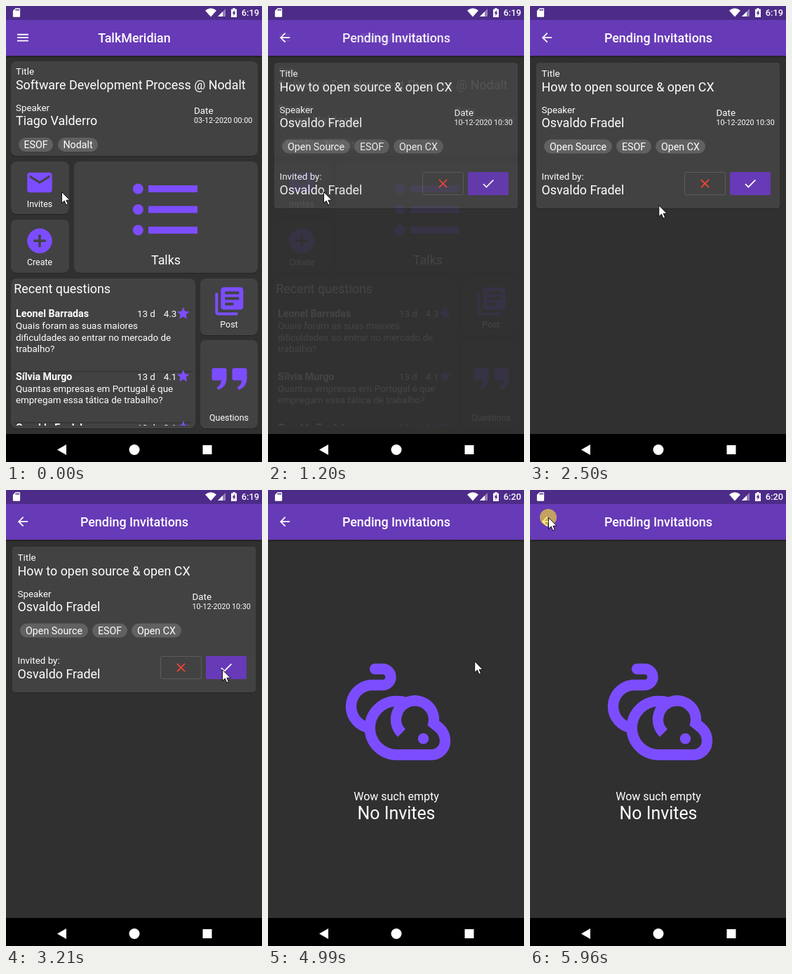
Write an HTML page that moves like this. It is 365 px wide and 651 px high and loops after 5.99 s.

```html
<!DOCTYPE html>
<html lang="pt">
<head>
<meta charset="utf-8">
<style>
html, body { margin: 0; width: 100%; height: 100%; overflow: hidden; background: #303030; }
svg { display: block; width: 365px; height: 651px; font-family: Roboto, sans-serif; fill: #fff; }
</style>
</head>
<body>
<svg id="stage" viewBox="0 0 365 651"></svg>
<script>
const ACCENT = '#7c4dff', PURPLE = '#673ab7';
const LOOP = 5990;
const SMALL = 13.4, CHIP = 14.25, LABEL = 12.45, LARGE = 17.9;

const paths = {
  menu: 'M3 18h18v-2H3v2zm0-5h18v-2H3v2zm0-7v2h18V6H3z',
  back: 'M20 11H7.83l5.59-5.59L12 4l-8 8 8 8 1.41-1.41L7.83 13H20v-2z',
  mail: 'M20 4H4c-1.1 0-2 .9-2 2v12c0 1.1.9 2 2 2h16c1.1 0 2-.9 2-2V6c0-1.1-.9-2-2-2zm0 4l-8 5-8-5V6l8 5 8-5v2z',
  add: 'M12 2a10 10 0 1 0 0 20a10 10 0 1 0 0-20zm5 11h-4v4h-2v-4H7v-2h4V7h2v4h4v2z',
  books: 'M4 6H2v14c0 1.1.9 2 2 2h14v-2H4V6zm16-4H8c-1.1 0-2 .9-2 2v12c0 1.1.9 2 2 2h12c1.1 0 2-.9 2-2V4c0-1.1-.9-2-2-2zm-1 9H9V9h10v2zm-4 4H9v-2h6v2zm4-8H9V5h10v2z',
  star: 'M12 17.27L18.18 21l-1.64-7.03L22 9.24l-7.19-.61L12 2 9.19 8.63 2 9.24l5.46 4.73L5.82 21z',
  close: 'M19 6.41L17.59 5 12 10.59 6.41 5 5 6.41 10.59 12 5 17.59 6.41 19 12 13.41 17.59 19 19 17.59 13.41 12z',
  check: 'M9 16.17L4.83 12l-1.42 1.41L9 19 21 7l-1.41-1.41z',
  sd: 'M18 2h-8L4 8v12c0 1.1.9 2 2 2h12c1.1 0 2-.9 2-2V4c0-1.1-.9-2-2-2zm-6 6h-2V4h2v4zm3 0h-2V4h2v4zm3 0h-2V4h2v4z'
};

const text = (x, y, size, str, attrs = '') => `<text x="${x}" y="${y}" font-size="${size}" ${attrs}>${str}</text>`;
const middle = (x, y, size, str, attrs = '') => text(x, y, size, str, `text-anchor="middle" ${attrs}`);
const rect = (x, y, w, h, fill, attrs = '') => `<rect x="${x}" y="${y}" width="${w}" height="${h}" fill="${fill}" ${attrs}/>`;
const icon = (name, x, y, scale, fill = '#fff') =>
  `<path d="${paths[name]}" fill="${fill}" transform="translate(${x} ${y}) scale(${scale}) translate(-12 -12)"/>`;
const card = (x, y, w, h, r = 8) =>
  rect(x, y + 1, w, h, '#000', `rx="${r}" opacity=".25"`) + rect(x, y, w, h, '#424242', `rx="${r}"`);
const chip = (x, y, w, str) => rect(x, y, w, 20, '#616161', 'rx="10"') + middle(x + w / 2, y + 15, CHIP, str);

const page = (title, nav) => rect(0, 0, 365, 651, '#303030') + rect(0, 71, 365, 4, 'url(#shade)') +
  rect(0, 0, 365, 71, PURPLE) + icon(nav, 24, 45.2, .888) + middle(183, 52, LARGE, title, 'font-weight="500"');

// Shared heading of both talk cards
const talk = (x, y, dateX, title, speaker, date) =>
  text(x, y, SMALL, 'Title') + text(x, y + 21, LARGE, title) +
  text(x, y + 51.5, SMALL, 'Speaker') + text(x, y + 72, LARGE, speaker) +
  text(dateX, y + 55.5, SMALL, 'Date') + text(dateX, y + 68.5, 10.7, date);

const question = (y, name, score, lines) =>
  text(14, y, CHIP, name, 'font-weight="700"') + text(187, y, SMALL, '13 d') + text(224.8, y, SMALL, score) +
  icon('star', 252.7, y - 5.3, .89, ACCENT) +
  lines.map((line, i) => text(14, y + 17.3 + i * 16.4, SMALL, line)).join('') +
  rect(11, y + 28 + lines.length * 16.3, 255, 2, '#000', 'opacity=".15" rx="1"');

const bullets = [261, 290.5, 320].map(y =>
  `<circle cx="188.3" cy="${y}" r="7.5" fill="${ACCENT}"/>` + rect(203, y - 5, 70, 10, ACCENT)).join('');

const quotes = [293.5, 322.5].map(x =>
  `<path d="M3 0h15q3 0 3 3v11q0 13-12 17l-2-3.5q6-3 6.5-10H3q-3 0-3-3V3q0-3 3-3z" fill="${ACCENT}" transform="translate(${x} 517)"/>`).join('');

const home = page('TalkMeridian', 'menu') +
  card(7, 79, 352, 135) +
  talk(14, 98, 268, 'Software Development Process @ Nodalt', 'Tiago Valderro', '03-12-2020 00:00') +
  chip(18, 188, 49, 'ESOF') + chip(74, 188, 57, 'Nodalt') +
  card(7, 222, 83, 75) + '<circle id="ripple" clip-path="url(#tile)"/>' +
  icon('mail', 48, 252, 1.776, ACCENT) + middle(48, 286.5, LABEL, 'Invites') +
  card(7, 305, 83, 76) + icon('add', 48, 335.3, 1.776, ACCENT) + middle(48, 370, LABEL, 'Create') +
  card(97, 222, 262, 159) + bullets + middle(228, 369, LARGE, 'Talks') +
  card(7, 389, 263, 214) + text(11.3, 410, LARGE, 'Recent questions') +
  '<g clip-path="url(#list)">' +
  question(444, 'Leonel Barradas', '4.3',
    ['Quais foram as suas maiores', 'dificuldades ao entrar no mercado de', 'trabalho?']) +
  question(533.5, 'Sílvia Murgo', '4.1',
    ['Quantas empresas em Portugal é que', 'empregam essa tática de trabalho?']) +
  question(606.5, 'Osvaldo Fradel', '3.1', []) + '</g>' +
  card(277, 389, 82, 81) + icon('books', 318.3, 421.5, 2, ACCENT) + middle(318, 458.5, LABEL, 'Post') +
  card(277, 477, 82, 126) + quotes + middle(318, 592, LABEL, 'Questions');

const invite = card(9, 81, 347, 208, 4) +
  talk(16.5, 101, 265.5, 'How to open source &amp; open CX', 'Osvaldo Fradel', '10-12-2020 10:30') +
  chip(20, 190.5, 97, 'Open Source') + chip(123, 190.5, 50, 'ESOF') + chip(179, 190.5, 71, 'Open CX') +
  text(16.5, 247.5, SMALL, 'Invited by:') + text(16.5, 268.5, LARGE, 'Osvaldo Fradel') +
  rect(220.5, 237.5, 58, 32, 'none', 'rx="2" stroke="#5c5c5c"') + icon('close', 249.5, 253.5, .888, '#f44336') +
  rect(285, 237, 58, 33, PURPLE, 'rx="2"') + rect(285, 237, 58, 33, '#fff', 'id="press" rx="2" opacity="0"') +
  icon('check', 314, 253.5, .888);

const mouse = `<g fill="none" stroke="${ACCENT}" stroke-width="15.4">
  <path stroke-linecap="round" d="M152.5 255.5H163.5a11.5 11.5 0 0 1 0 23H145a30.8 30.8 0 0 0 0 61"/>
  <path d="M190.5 347A27 27 0 1 1 236 333L244 339.5Q252.5 347 252.5 358.5A19.5 19.5 0 0 1 233 378H183.5a38.3 38.3 0 0 1 0-76.6q7 0 13 2"/>
  </g><circle cx="221.5" cy="355" r="7.7" fill="${ACCENT}"/>`;

const empty = mouse + middle(183, 443, 16, 'Wow such empty') + middle(183, 470, 24.9, 'No Invites');

const systemBars = rect(0, 0, 365, 20, '#000', 'opacity=".25"') + icon('sd', 15, 9.3, .64) +
  '<path d="M284 6.5Q292 0 300 6.5L292 15.5z"/>' +
  '<path d="M313 4V15H302z" opacity=".4"/><path d="M309 8V15H302z"/>' +
  '<path d="M321 4.5h2.5V3h3v1.5H329V16h-8z"/><path d="M326 6l-3.5 4.5h2V14l3-4.5h-1.5z" fill="#4d2c89"/>' +
  text(361, 14, 12.8, '', 'id="clock" text-anchor="end" font-weight="500"') +
  rect(0, 611, 365, 40, '#000') + '<path d="M86 626V641L73 633.5z"/>' +
  '<circle cx="183" cy="633.5" r="7.5"/>' + rect(280.5, 627, 13, 13, '#fff');

stage.innerHTML = `<defs>
  <linearGradient id="shade" x2="0" y2="1"><stop stop-opacity=".3"/><stop offset="1" stop-opacity="0"/></linearGradient>
  <clipPath id="tile">${rect(7, 222, 83, 75, '#fff', 'rx="8"')}</clipPath>
  <clipPath id="list">${rect(7, 425, 263, 174, '#fff')}</clipPath></defs>
  <g>${home}</g>
  <g id="pending">${page('Pending Invitations', 'back')}<g id="invite">${invite}</g><g id="empty">${empty}</g></g>
  ${systemBars}
  <g id="pointer"><circle id="click" r="12" fill="#ffe628" opacity=".6"/>
  <path d="M.5 .5V16.5L4.2 13.1 6.7 19 9.3 17.9 6.9 12.2H12z" stroke="#000" stroke-width=".9"/></g>`;

const el = id => document.getElementById(id);
const set = (id, attrs) => { for (const k in attrs) el(id).setAttribute(k, attrs[k]); };
const show = (id, on) => set(id, { visibility: on ? 'visible' : 'hidden' });

// Linear interpolation through [time, ...values]
function along(keys, t) {
  const i = keys.findIndex(k => k[0] > t);
  if (i === 0) return keys[0].slice(1);
  if (i < 0) return keys[keys.length - 1].slice(1);
  const a = keys[i - 1], b = keys[i], p = (t - a[0]) / (b[0] - a[0]);
  return a.slice(1).map((v, j) => v + (b[j + 1] - v) * p);
}

const track = [
  [1600, 79, 265], [1710, 94, 265], [1840, 94, 265], [2400, 160, 278], [2470, 160, 278],
  [2500, 183, 284], [2630, 222, 291], [2750, 252, 285], [3080, 308, 258], [3110, 308, 258],
  [3210, 308, 256], [4960, 308, 256], [5480, 77, 55], [5530, 57, 47], [5600, 57, 47], [5860, 26, 39]
];
const fade = [[840, 0], [920, .33], [1010, .33], [1020, .5], [1200, .9], [1219, .9], [1220, 1]];
const splash = [[640, 72, 264, 4, 0], [700, 66, 262, 12, .1], [900, 48, 257, 30, .1], [1200, 48, 257, 38, 0]];
const press = [[4010, 0], [4070, .16], [4150, .16], [4270, 0]];
const clicks = [[640, 800], [4010, 4130], [5960, LOOP]];

function draw(now) {
  const t = now % LOOP;
  set('pointer', { transform: `translate(${along(track, t)})` });
  set('pending', { opacity: along(fade, t)[0] });
  set('press', { opacity: along(press, t)[0] });
  const [cx, cy, r, opacity] = along(splash, t);
  set('ripple', { cx, cy, r, opacity });
  show('click', clicks.some(([from, to]) => t >= from && t < to));
  show('invite', t < 4560);
  show('empty', t >= 4560);
  el('clock').textContent = t < 4190 ? '6:19' : '6:20';
}

const start = performance.now();
function tick() {
  draw(performance.now() - start);
  requestAnimationFrame(tick);
}
tick();
</script>
</body>
</html>
```
